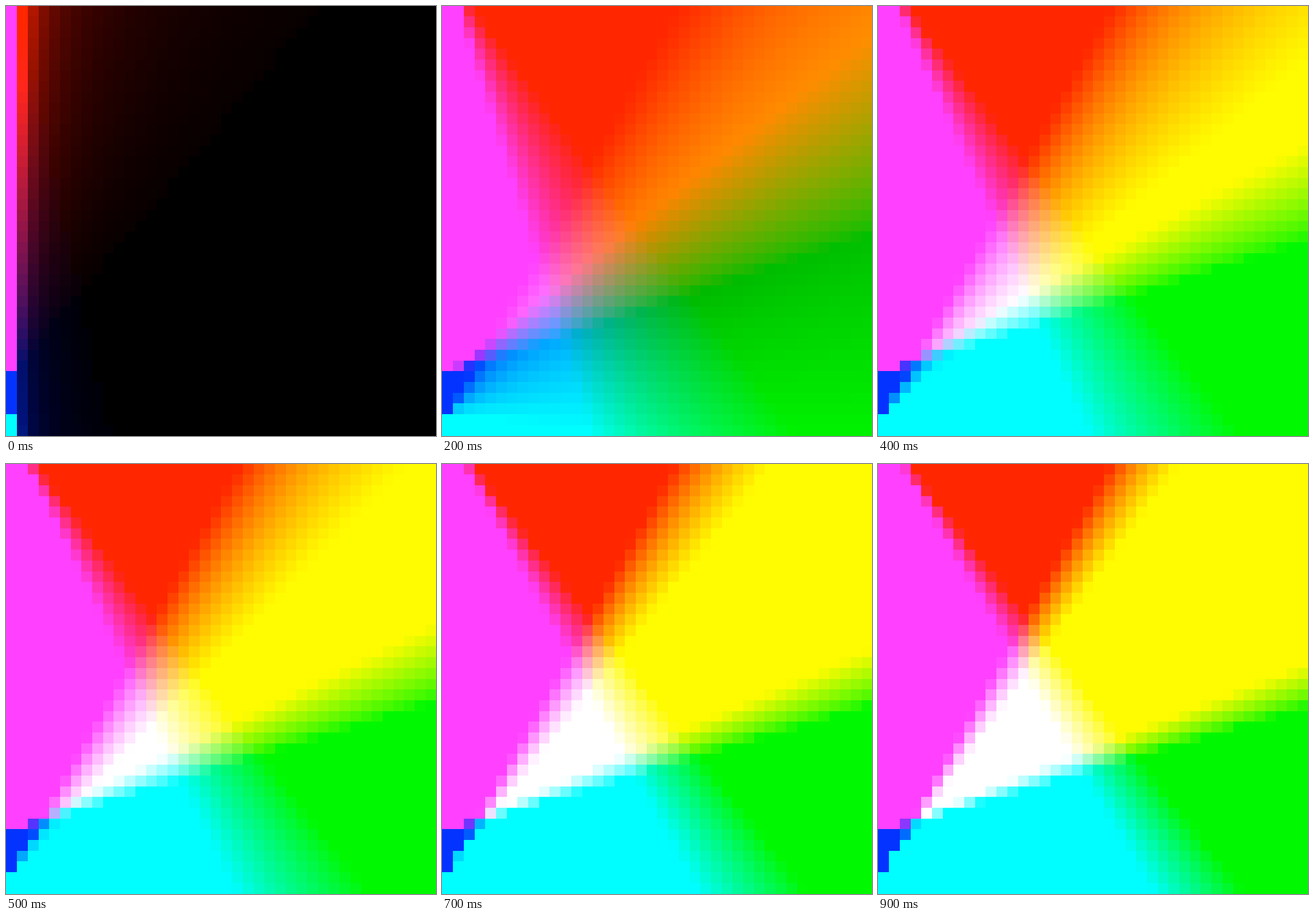
These frames come from a looping animation (748x748 px, 1 s). An HTML page with a canvas:

```html
<!DOCTYPE html>
<html lang="en">
<head>
<meta charset="utf-8">
<title>Chromaticity plane</title>
<style>
  html, body { margin: 0; width: 100%; height: 100%; overflow: hidden; background: #000; }
  canvas { display: block; width: 100vw; height: 100vh; }
</style>
</head>
<body>
<canvas id="stage" width="748" height="748"></canvas>
<script>
const SIZE = 748, CELLS = 40, STEPS = 10, STEP_MS = 100, PITCH = SIZE / CELLS;
const ctx = document.getElementById('stage').getContext('2d');

// XYZ of chromaticity (x, y) at luminance Y
const xyz = (x, y, Y = y) => [x, y, 1 - x - y].map(v => v * Y / y);

const WHITE = xyz(0.3127, 0.329, 1);
const SRGB = [xyz(0.64, 0.33), xyz(0.3, 0.6), xyz(0.15, 0.06)];
const SCREEN = [xyz(0.63, 0.34), xyz(0.295, 0.605), xyz(0.155, 0.077)];

const clamp = v => Math.min(1, Math.max(0, v));

const det = ([a, b, c], [d, e, f], [g, h, i]) =>
  a * (e * i - f * h) - b * (d * i - f * g) + c * (d * h - e * g);

// Share of primary i in v, by the line through the other two
const share = (v, tri, i) => det(v, tri[(i + 1) % 3], tri[(i + 2) % 3]);

const toRgb = (v, tri) => tri.map((_, i) => share(v, tri, i) / share(WHITE, tri, i));

const toXyz = (rgb, tri) => WHITE.map((_, axis) =>
  tri.reduce((sum, p, i) => sum + rgb[i] * p[axis] * share(WHITE, tri, i), 0) / det(...tri));

function encode(v) {
  v = clamp(v);
  return Math.round(255 * (v <= 0.0031308 ? 12.92 * v : 1.055 * v ** (1 / 2.4) - 0.055));
}

// Unencoded sRGB values shown on a gamma 1.8 screen
function colour(x, y, Y) {
  const light = toRgb(xyz(x, Math.max(y, 1e-9), Y), SRGB)
    .map(v => v < 0.034 ? 0 : clamp(v) ** 1.8);
  return `rgb(${toRgb(toXyz(light, SCREEN), SRGB).map(encode)})`;
}

function draw(step) {
  const Y = 0.01 + 0.25 * step;
  for (let row = 0; row < CELLS; row++) {
    for (let col = 0; col < CELLS; col++) {
      // Later cells overpaint the rest of the stage
      ctx.fillStyle = colour(1 - (row + 1) / CELLS, col / CELLS, Y);
      ctx.fillRect(Math.ceil(col * PITCH), Math.floor(row * PITCH), SIZE, PITCH + 1);
    }
  }
}

let shown = -1;
function tick() {
  const step = Math.floor(performance.now() / STEP_MS) % STEPS;
  if (step !== shown) draw(shown = step);
  requestAnimationFrame(tick);
}
tick();
</script>
</body>
</html>
```
